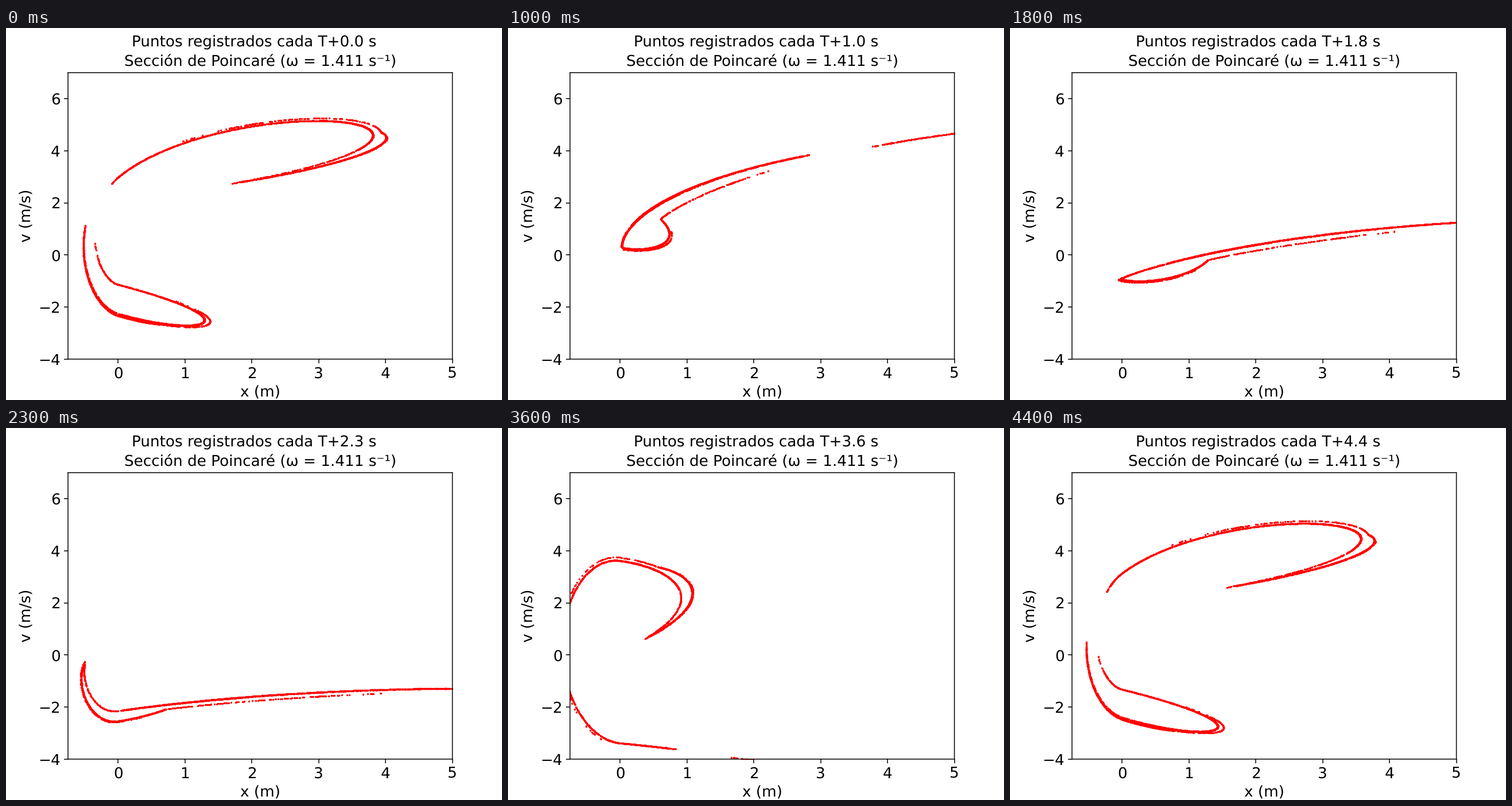
Recreate the animation shown at these times as a matplotlib script. Size 864 px wide and 648 px high, loop 4.5 s.

```python
import numpy as np
import matplotlib.pyplot as plt
from matplotlib.animation import FuncAnimation

plt.rcParams.update({"font.size": 14, "text.hinting": "none",
                     "path.snap": False})

# Forced, damped oscillator with a soft spring for x > 0 and a stiff one for x < 0
OMEGA = 1.411
PERIOD = 2 * np.pi / OMEGA
FORCE, DAMPING = 4.0, 0.252
K_SOFT, K_STIFF = 0.25, 16.0

FRAMES, STEP = 45, 0.1
STARTS, WARMUP, RECORDED = 500, 16, 12


def rate(t, s):
    x, v = s
    k = np.where(x < 0, K_STIFF, K_SOFT)
    return np.array([v, FORCE * np.cos(OMEGA * t) - DAMPING * v - k * x])


def advance(s, t, span, n):
    """Classic Runge-Kutta over `span` seconds in n steps."""
    h = span / n
    for i in range(n):
        ti = t + i * h
        a = rate(ti, s)
        b = rate(ti + h / 2, s + h / 2 * a)
        c = rate(ti + h / 2, s + h / 2 * b)
        d = rate(ti + h, s + h * c)
        s = s + h / 6 * (a + 2 * b + 2 * c + d)
    return s


def section():
    """Points of the attractor at phase zero."""
    rng = np.random.default_rng(7)
    x = rng.uniform(0.0, 1.0, STARTS)
    s = np.array([x, -2.27 - 0.45 * x + rng.normal(0, 0.01, STARTS)])
    hits = []
    for n in range(WARMUP + RECORDED):
        s = advance(s, 0, PERIOD, 400)
        if n >= WARMUP:
            hits.append(s)
    return np.hstack(hits)


states = [section()]
for i in range(FRAMES - 1):
    states.append(advance(states[-1], i * STEP, STEP, 12))

fig, ax = plt.subplots(figsize=(6.4, 4.8), dpi=135)
ax.set_xlim(-0.75, 5)
ax.set_ylim(-4, 7)
ax.set_xticks(range(6))
ax.set_yticks(range(-4, 7, 2))
ax.set_xlabel("x (m)")
ax.set_ylabel("v (m/s)")
ax.set_title(f"Sección de Poincaré (ω = {OMEGA} s⁻¹)", fontsize=14)
header = fig.suptitle("", fontsize=14)
dots, = ax.plot([], [], "r.", markersize=1.5)


def draw(i):
    dots.set_data(*states[i])
    header.set_text(f"Puntos registrados cada T+{i * STEP:.1f} s")
    return dots, header


anim = FuncAnimation(fig, draw, frames=FRAMES, interval=100, repeat=True,
                     repeat_delay=0, blit=False)
plt.show()
```
